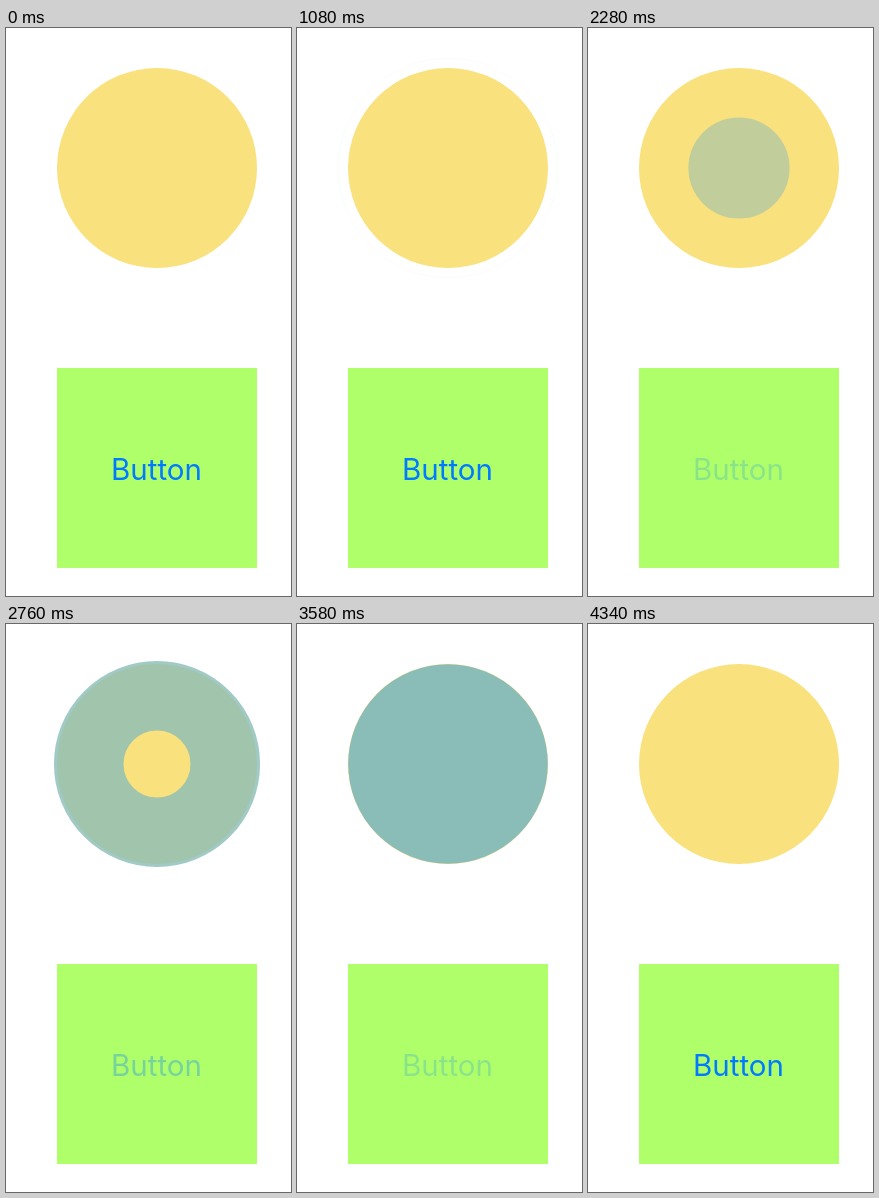
An HTML page for the animation above (4900 ms loop, 285 by 568 pixels).

```html
<!DOCTYPE html>
<html lang="en">
<head>
<meta charset="utf-8">
<title>Ripple button</title>
<style>
  html, body { margin: 0; width: 100%; height: 100%; overflow: hidden; background: #fff; }
  svg { display: block; width: 285px; height: 568px; }
  text { font: 29.5px Inter, sans-serif; text-anchor: middle; fill: #007aff; }
  #ripple { fill: none; stroke: #8abdb8; }
</style>
</head>
<body>
<svg viewBox="0 0 285 568">
  <circle cx="151" cy="140" r="100" fill="#f9e17e"/>
  <circle id="ripple" cx="151" cy="140" r="0" stroke-width="0"/>
  <rect x="51" y="340" width="200" height="200" fill="#afff6b"/>
  <text id="label" x="150.5" y="451.5">Button</text>
</svg>
<script>
  const LOOP = 4900, SPREAD = 250, FADE = 375;
  const RADIUS = 100, GROWN = 110, DIM = 0.2;

  // Two taps, then two long presses.
  const presses = [
    { down: 606, up: 715 },
    { down: 1394, up: 1525 },
    { down: 2207, up: 2710 },
    { down: 3346, up: 3970 },
  ];

  const ripple = document.getElementById('ripple');
  const label = document.getElementById('label');

  const progress = (t, start, length) => Math.min(1, Math.max(0, (t - start) / length));

  // Same curve as cubic-bezier(.25, .1, .25, 1).
  function ease(x) {
    const bezier = (a, b, s) => 3 * a * s * (1 - s) ** 2 + 3 * b * s * s * (1 - s) + s ** 3;
    let lo = 0, hi = 1;
    for (let i = 0; i < 20; i++) {
      const mid = (lo + hi) / 2;
      if (bezier(0.25, 0.25, mid) < x) lo = mid; else hi = mid;
    }
    return bezier(0.1, 1, hi);
  }

  // The stroke fills the band between the hole and the outer edge.
  function drawRing(hole, outer, opacity) {
    ripple.setAttribute('r', (hole + outer) / 2);
    ripple.setAttribute('stroke-width', outer - hole);
    ripple.setAttribute('opacity', opacity);
  }

  function draw(t) {
    const press = presses.findLast(p => p.down <= t);
    if (!press) {
      drawRing(0, 0, 0);
      label.setAttribute('opacity', 1);
      return;
    }
    // A short tap still lets the ripple spread fully before it leaves.
    const leave = Math.max(press.up, press.down + SPREAD);
    const grow = ease(progress(t, press.down, SPREAD));
    const out = progress(t, leave, SPREAD);
    const open = ease(out);
    drawRing(GROWN * open, RADIUS * grow + (GROWN - RADIUS) * open, grow * (1 - out));
    label.setAttribute('opacity', DIM + (1 - DIM) * ease(progress(t, press.up, FADE)));
  }

  const start = performance.now();
  function tick() {
    draw((performance.now() - start) % LOOP);
    requestAnimationFrame(tick);
  }
  tick();
</script>
</body>
</html>
```
